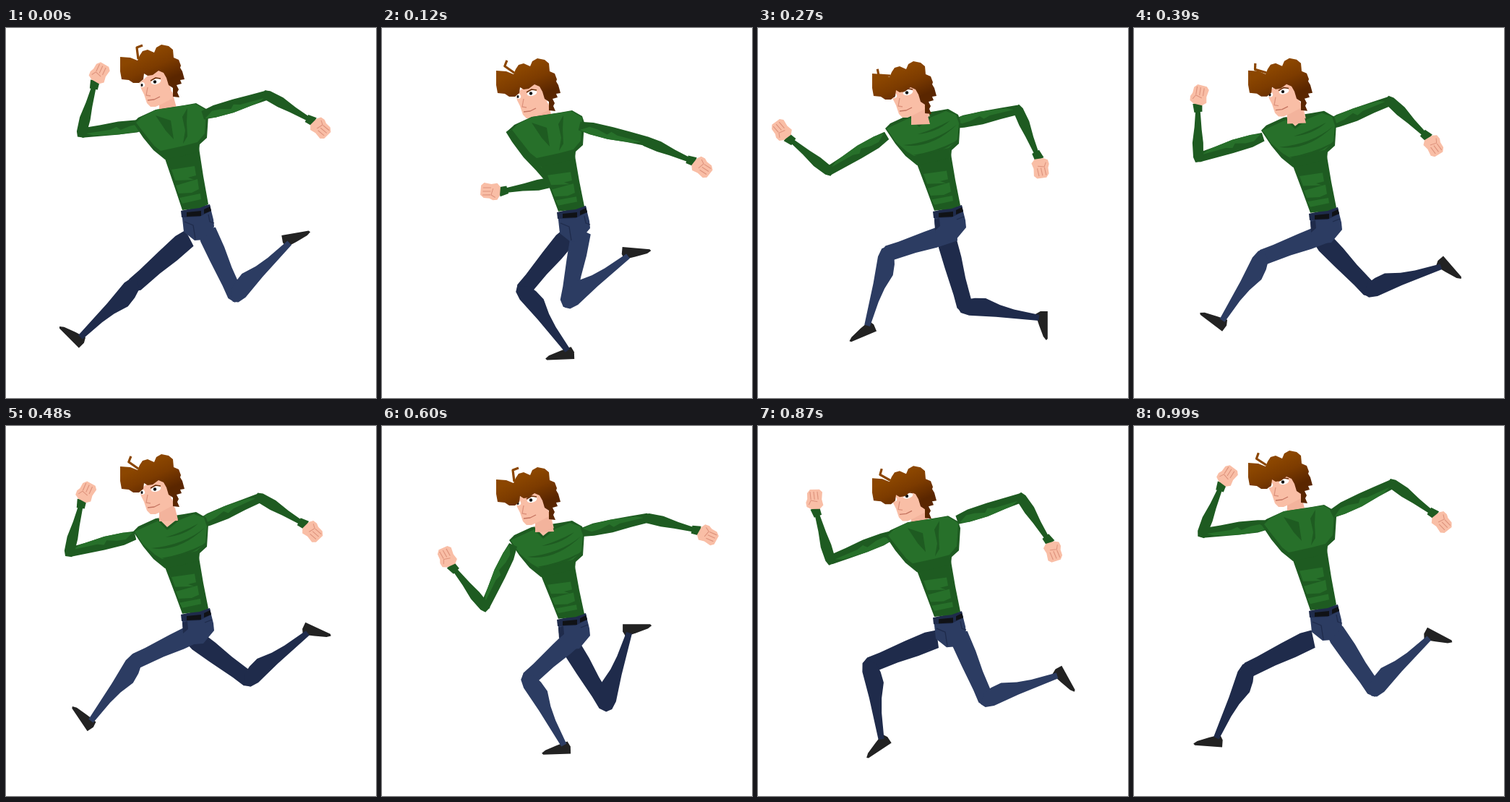
Recreate the animation shown at these times as an HTML page with a canvas. Size 512 by 512 pixels, loop 1.02 s.

```html
<!DOCTYPE html>
<html lang="en">
<head>
<meta charset="utf-8">
<title>Running man</title>
<style>
html, body { margin: 0; width: 100%; height: 100%; overflow: hidden; background: #fff; }
canvas { display: block; width: 100vw; height: 100vh; }
</style>
</head>
<body>
<canvas id="stage" width="512" height="512"></canvas>
<script>
const ctx = document.getElementById('stage').getContext('2d');
const LOOP = 1020, STEP = 30, RAD = Math.PI / 180;
const TIMES = [0, 120, 270, 480, 600, 750, 990];
const GREEN = '#27702a', DARK = '#1e5b21', SKIN = '#f9bea6', SHADE = '#dd927c';
const JEANS = '#2c3c62', NAVY = '#1f2b4b', SHOE = '#222';

// Joint angles in degrees, clockwise from the right.
const farArm = {
  x: [192, 180, 274, 271, 282, 182, 182],
  y: [134, 145, 132, 134, 146, 162, 137],
  upper: [173, 51, -12, -23, -12, 124, 173],
  fore: [285, 170, 67, 31, 14, 175, 292],
  lit: -1
};
const nearArm = {
  x: [278, 279, 173, 173, 179, 282, 279],
  y: [119, 137, 152, 153, 170, 145, 119],
  upper: [-17, 13, 149, 166, 115, 0, -26],
  fore: [30, 23, 219, 284, 231, 87, 36],
  lit: 1
};
const farLeg = {
  x: [251, 258, 261, 258, 260, 246, 245],
  y: [292, 288, 291, 292, 302, 295, 295],
  thigh: [139, 130, 75, 37, 59, 160, 154],
  shin: [136, 54, 9, -38, -72, 47, 115],
  foot: [225, 178, 90, 25, 0, 113, 184],
  color: NAVY
};
const nearLeg = {
  x: [278, 276, 272, 268, 275, 277, 278],
  y: [281, 283, 282, 284, 285, 291, 284],
  thigh: [66, 101, 162, 155, 138, 90, 56],
  shin: [-44, -37, 106, 127, 62, 19, -43],
  foot: [-10, 5, 157, 236, 178, 90, 28],
  color: JEANS
};
const bob = {
  hair: [0, 19, 23, 16, 34, 42, 11],
  face: [0, 16, 15, 13, 28, 35, 3],
  chest: [0, 10, 8, 15, 27, 28, 5],
  belt: [0, 2, 1, 8, 15, 17, 3],
  curl: [0, -48, -80, -48, 0, -55, -50]
};

// Periodic monotone cubic interpolation.
function sample(v, t) {
  const n = TIMES.length;
  const wrap = i => (i + n) % n;
  const gap = i => (TIMES[wrap(i + 1)] - TIMES[wrap(i)] + LOOP) % LOOP;
  const rate = i => (v[wrap(i + 1)] - v[wrap(i)]) / gap(i);
  const slope = i => {
    const a = rate(i - 1), b = rate(i);
    return a * b <= 0 ? 0 : 2 * a * b / (a + b);
  };
  let i = n - 1;
  while (TIMES[i] > t) i--;
  const h = gap(i), u = (t - TIMES[i]) / h, w = 1 - u;
  return v[i] * (1 + 2 * u) * w * w + v[wrap(i + 1)] * u * u * (3 - 2 * u)
    + h * u * w * (slope(i) * w - slope(i + 1) * u);
}

function trace(pts) {
  ctx.beginPath();
  for (let i = 0; i < pts.length; i += 2) ctx.lineTo(pts[i], pts[i + 1]);
}
function poly(color, ...pts) {
  trace(pts);
  ctx.closePath();
  ctx.fillStyle = color;
  ctx.fill();
}
function line(color, width, ...pts) {
  trace(pts);
  ctx.strokeStyle = color;
  ctx.lineWidth = width;
  ctx.stroke();
}
function oval(color, x, y, rx, ry, tilt = 0) {
  ctx.beginPath();
  ctx.ellipse(x, y, rx, ry, tilt, 0, 7);
  ctx.fillStyle = color;
  ctx.fill();
}
function lens(color, x1, y1, ax, ay, x2, y2, bx, by) {
  ctx.beginPath();
  ctx.moveTo(x1, y1);
  ctx.quadraticCurveTo(ax, ay, x2, y2);
  ctx.quadraticCurveTo(bx, by, x1, y1);
  ctx.fillStyle = color;
  ctx.fill();
}
function at(x, y, deg, draw) {
  ctx.save();
  ctx.translate(x, y);
  ctx.rotate(deg * RAD);
  draw();
  ctx.restore();
}
const reach = (x, y, deg, len) => [x + len * Math.cos(deg * RAD), y + len * Math.sin(deg * RAD)];

function fist() {
  poly(SKIN, 0, -6, 3, -12, 9, -13, 14, -11, 22, -11, 27, -7, 27, 6, 23, 10, 13, 9, 5, 11, 0, 6);
  for (const y of [-6, -1, 4]) line(SHADE, 1.1, 13, y, 24, y - 1);
  line(SHADE, 1, 6, -9, 12, -6, 10, 3);
}

function arm(a, t) {
  const x = sample(a.x, t), y = sample(a.y, t);
  const up = sample(a.upper, t), low = sample(a.fore, t), s = a.lit;
  const [ex, ey] = reach(x, y, up, 88);
  at(x, y, up, () => {
    poly(DARK, -6, -6, 12, -9, 40, -9, 64, -8, 88, -7, 93, 0, 88, 6, 62, 7, 36, 9, 10, 8, -6, 6);
    poly(GREEN, -4, 5 * s, 8, -2 * s, 20, -1 * s, 34, 3 * s, 39, -2 * s, 48, s, 82, 2 * s, 72, 6 * s, 36, 9 * s, 10, 8 * s);
  });
  at(ex, ey, low, () => {
    poly(DARK, -7, -4, 0, -7, 20, -8, 42, -5, 68, -3, 68, 3, 38, 5, 20, 7, 0, 7, -6, 5);
    poly(DARK, 62, -5, 74, -7, 75, 6, 63, 6);
    at(73, 0, 15, fist);
  });
}

function leg(l, t) {
  const x = sample(l.x, t), y = sample(l.y, t);
  const up = sample(l.thigh, t), low = sample(l.shin, t);
  const [kx, ky] = reach(x, y, up, 97);
  const [ax, ay] = reach(kx, ky, low, 104);
  at(ax, ay, sample(l.foot, t), () =>
    poly(SHOE, 4, 2, -5, 5, -9, -2, -9, -12, 29, -12, 31, -10, 26, -6, 10, 0));
  at(x, y, up, () =>
    poly(l.color, -6, 11, 10, 14, 40, 13, 78, 11, 97, 11, 106, 5, 105, -5, 95, -11, 60, -11, 30, -13, 0, -13));
  at(kx, ky, low, () =>
    poly(l.color, -9, 4, -4, 10, 8, 12, 45, 8, 104, 4, 104, -4, 68, -6, 48, -9, 27, -15, 12, -13, 0, -9));
}

function pelvis(dy, back) {
  at(0, dy, 0, () => {
    poly(JEANS, 243, 254, 282, 245, 287, 265, 288, 275, 273, 293, 261, 294, 246, 282);
    if (back) {
      line(NAVY, 1.3, 247, 268, 259, 273, 262, 292);
      line(NAVY, 1.3, 280, 258, 282, 268, 288, 270);
    } else {
      poly(NAVY, 244, 264, 251, 262, 252, 273, 245, 279);
      line(NAVY, 1.2, 275, 264, 285, 260);
    }
    poly(NAVY, 242, 253, 282, 244, 284, 253, 268, 261, 243, 262);
    poly('#101216', 250, 255, 270, 253, 270, 260, 250, 261);
    poly('#101216', 274, 251, 282, 247, 284, 253, 274, 257);
  });
}

function belly(chest, belt) {
  const k = 1 + (belt - chest) / 75;
  ctx.save();
  ctx.transform(1, 0, 0, k, 0, chest + 175 * (1 - k));
  poly(DARK, 219, 178, 267, 166, 273, 205, 280, 244, 268, 249, 244, 252, 234, 222);
  poly(GREEN, 229, 196, 261, 191, 263, 204, 252, 207, 260, 210, 234, 211);
  poly(GREEN, 235, 218, 265, 209, 267, 223, 257, 228, 239, 229);
  poly(GREEN, 240, 235, 269, 229, 270, 237, 257, 240, 244, 243);
  ctx.restore();
}

function chest(dy, back) {
  at(0, dy, 0, () => {
    poly(DARK, 176, 131, 183, 124, 207, 113, 246, 107, 263, 104, 277, 112, 280, 121, 278, 152, 268, 161, 267, 171, 245, 177, 220, 182, 204, 169, 190, 152);
    if (back) {
      poly(GREEN, 180, 131, 188, 123, 208, 113, 262, 105, 277, 114, 275, 146, 265, 158, 246, 163, 214, 170, 205, 163, 190, 144);
      poly(DARK, 207, 121, 228, 128, 232, 154, 221, 142);
      poly(DARK, 251, 111, 244, 123, 248, 142, 245, 160, 251, 150, 250, 130);
    } else {
      poly(GREEN, 178, 131, 211, 116, 224, 127, 238, 116, 260, 107, 274, 112, 278, 124, 276, 146, 264, 158, 216, 169, 206, 163, 190, 149);
      lens(DARK, 201, 154, 240, 160, 276, 125, 246, 150);
      lens(DARK, 221, 139, 247, 137, 266, 120, 244, 132);
      lens(DARK, 214, 168, 248, 170, 275, 148, 246, 163);
      poly(SKIN, 213, 105, 234, 98, 238, 115, 224, 127, 211, 115);
      line(DARK, 3, 210, 114, 223, 127, 238, 115);
    }
  });
}

function face(dy) {
  at(0, dy, 0, () => {
    poly('#f3b39c', 212, 98, 230, 88, 238, 118, 212, 119);
    poly(SKIN, 185, 76, 205, 58, 222, 58, 228, 84, 231, 97, 216, 105, 207, 109, 200, 109, 195, 104, 191, 92, 187, 84);
    oval('#fff', 207.5, 74, 7, 3.8, -0.25);
    oval('#fff', 189, 78.5, 3.2, 3.4, -0.25);
    oval('#111', 206, 74.5, 2.2, 2.2);
    oval('#111', 188, 79, 1.5, 2);
    line('#6a2e08', 1.5, 200, 73, 207, 69, 214, 70);
    line(SHADE, 1.3, 196, 82, 194, 93, 200, 94);
    line('#c47460', 1.3, 196, 100, 205, 99, 213, 95);
  });
}

function hair(dy, curl) {
  at(0, dy, 0, () => {
    const g = ctx.createLinearGradient(192, 38, 209, 78);
    g.addColorStop(0, '#8b4600');
    g.addColorStop(0.45, '#7c3b00');
    g.addColorStop(1, '#5a2600');
    at(183, 43, curl, () => line('#8b4600', 3.2, 0, 0, -2, -16, 6, -19));
    poly(g, 158, 40, 172, 41, 182, 45, 185, 38, 189, 32, 196, 30, 205, 34, 208, 27, 215, 23, 225, 25, 231, 30, 232, 41,
      239, 44, 242, 52, 241, 55, 244, 60, 247, 71, 241, 72, 243, 77, 236, 79, 239, 85, 237, 89, 240, 96, 231, 95,
      231, 83, 225, 79, 222, 69, 218, 62, 211, 59, 203, 65, 196, 66, 191, 63, 190, 71, 184, 76, 176, 76, 170, 72, 160, 71, 158, 60);
  });
}

function draw(t) {
  const [top, head, torso, hip, curl] =
    [bob.hair, bob.face, bob.chest, bob.belt, bob.curl].map(v => sample(v, t));
  const back = t < 180 || t >= 690;
  ctx.fillStyle = '#fff';
  ctx.fillRect(0, 0, 512, 512);
  arm(farArm, t);
  leg(farLeg, t);
  leg(nearLeg, t);
  pelvis(hip, back);
  belly(torso, hip);
  if (back) face(head);
  chest(torso, back);
  if (!back) face(head);
  hair(top, curl);
  arm(nearArm, t);
}

const start = performance.now();
function tick() {
  const t = (performance.now() - start) % LOOP;
  draw(Math.floor(t / STEP) * STEP);
  requestAnimationFrame(tick);
}
ctx.lineJoin = 'round';
tick();
</script>
</body>
</html>
```
